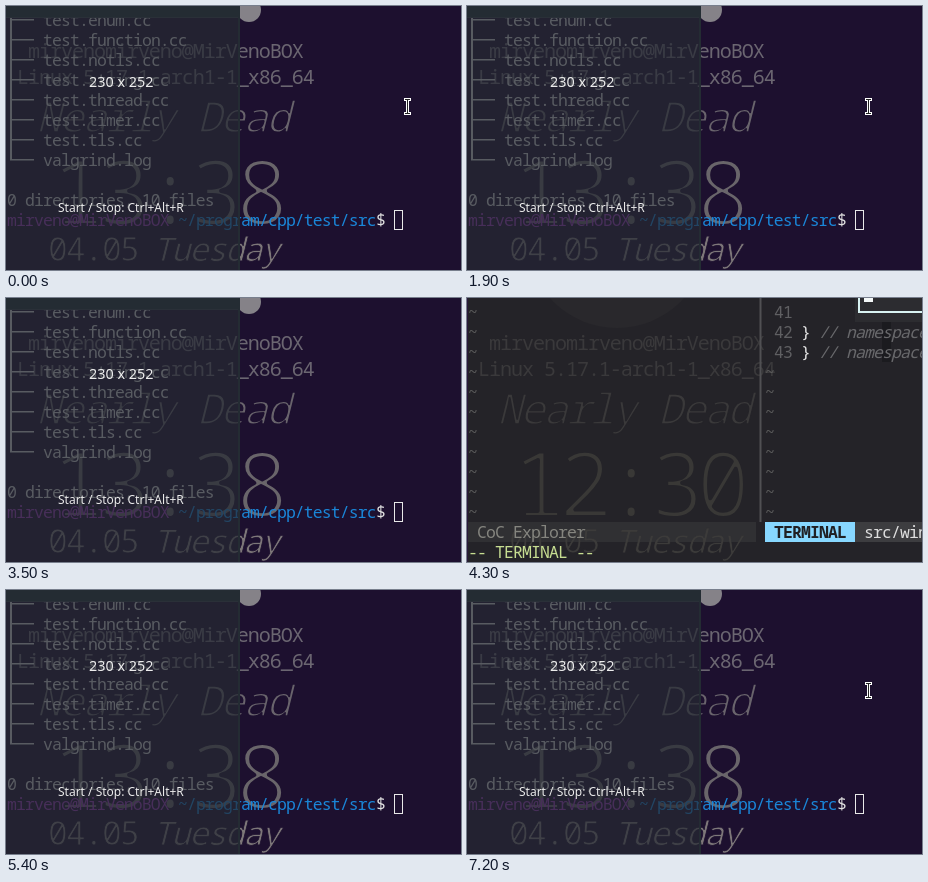
These frames come from a looping animation (455x264 px, 7400 ms). An HTML page with a canvas:

```html
<!DOCTYPE html>
<html lang="en">
<head>
<meta charset="utf-8">
<title>Flickering terminal</title>
<style>
  html, body { margin: 0; width: 100%; height: 100%; overflow: hidden; background: #242328; }
  canvas { display: block; }
</style>
</head>
<body>
<canvas id="stage" width="455" height="264"></canvas>
<script>
const ctx = document.getElementById('stage').getContext('2d');
const layer = document.createElement('canvas');
layer.width = 455;
layer.height = 264;
const ltx = layer.getContext('2d');

const LOOP = 7400, CELL = 9, ROW = 20;
const USER = 'mirveno', HOST = 'MirVenoBOX';

// The screen flips between the two windows at each of these times.
const FLIPS = [400, 1000, 1100, 1500, 1600, 1900, 2000, 2100, 2400, 3000, 3100,
  3500, 3700, 3900, 4000, 4200, 4300, 5000, 5100, 5200, 5300, 5400, 5500, 5600,
  5700, 6400, 6500, 7000];

const col = n => 1 + n * CELL;
const base = row => 20 + row * ROW;

function rect(x, y, w, h, color) {
  ctx.fillStyle = color;
  ctx.fillRect(x, y, w, h);
}

function disc(x, y, r, color) {
  ctx.fillStyle = color;
  ctx.beginPath();
  ctx.arc(x, y, r, 0, 7);
  ctx.fill();
}

// Monospaced text on a grid of the given advance.
function mono(text, x, y, color, { adv = CELL, style = '', ratio = 1.83, g = ctx } = {}) {
  g.font = `${style} ${adv * ratio}px "Noto Sans Mono", monospace`;
  g.letterSpacing = `${adv * (1 - 0.6 * ratio)}px`;
  g.fillStyle = color;
  g.fillText(text, x, y);
}

// Large light text: the outline is cut away from the regular weight.
function thin(text, x, y, color, cut, options) {
  ltx.clearRect(0, 0, 455, 264);
  mono(text, x, y, color, { ...options, g: ltx });
  ltx.globalCompositeOperation = 'destination-out';
  ltx.lineWidth = cut;
  ltx.lineJoin = 'round';
  ltx.strokeText(text, x, y);
  ltx.globalCompositeOperation = 'source-over';
  ctx.drawImage(layer, 0, 0);
}

function label(text, x, y, size) {
  ctx.font = `${size}px "Noto Sans", sans-serif`;
  ctx.letterSpacing = '0px';
  ctx.fillStyle = '#ececec';
  ctx.fillText(text, x, y);
}

function desktop(clock, [info, mood, time, date]) {
  mono(`${USER}${USER}@${HOST}`, 22, 52, info, { adv: 11 });
  mono('Linux 5.17.1-arch1-1_x86_64', 11, 78, info, { adv: 11 });
  thin('Nearly Dead', 30, 126, mood, 1.7, { adv: 23, style: 'italic' });
  thin(clock, 45, 219, time, 4, { adv: 46, ratio: 1.97 });
  thin('04.05', 42, 255, date, 0.8, { adv: 18 });
  thin('Tuesday', 147, 255, date, 0.8, { adv: 18, style: 'italic' });
}

function shell() {
  rect(0, 0, 455, 264, '#1d102f');
  disc(243, 4, 12, '#858288');
  desktop('13:38', ['#6b6671', '#69646c', '#69656a', '#7d7779']);

  const files = ['enum', 'function', 'notls', 'string', 'thread', 'timer', 'tls'];
  const ink = '#d2d2d2';
  files.forEach((name, i) => mono(`test.${name}.cc`, col(4), base(i), ink));
  mono('valgrind.log', col(4), base(7), ink);
  rect(4, 0, 2, 154, ink);
  for (let i = 0; i < 8; i++) rect(4, 13 + i * ROW, 24, 1.5, ink);
  mono('0 directories, 10 files', col(0), base(9), ink);
  mono(`${USER}@${HOST}`, col(0), base(10), '#963ab5');
  mono('~/program/cpp/test/src', col(19), base(10), '#1a86d8');
  mono('$', col(41), base(10), '#e0e0e0');
  ctx.strokeStyle = '#e8e8e8';
  ctx.lineWidth = 1;
  ctx.strokeRect(388.5, 204.5, 8, 19);

  // Recorder window dimming the left half
  rect(0, 0, 234, 264, 'rgba(38, 42, 50, .7)');
  rect(0, 0, 234, 11, '#242c33');
  rect(0, 11, 234, 1, '#2a3038');
  rect(232, 11, 2, 253, '#242c33');
  label('230 x 252', 83, 81, 14.4);
  label('Start / Stop: Ctrl+Alt+R', 52, 206, 12);
}

function pointer() {
  rect(398, 92, 7, 3, '#fff');
  rect(398, 106, 7, 3, '#fff');
  rect(400, 92, 3, 17, '#fff');
  rect(399, 93, 5, 1, '#222');
  rect(399, 107, 5, 1, '#222');
  rect(401, 93, 1, 15, '#222');
}

function editor() {
  rect(0, 0, 455, 264, '#242328');
  rect(0, 0, 1, 264, '#2b1a3c');
  disc(150, -60, 90, '#29282c');
  rect(col(46), 24, CELL, 40, '#1b1b1f');
  rect(1, 224, 288, ROW, '#303033');
  rect(388, 224, 67, ROW, '#3d3d40');
  desktop('12:30', ['#3a393b', '#3a393a', '#393836', '#3c3b3a']);

  for (let i = 0; i < 11; i++) {
    mono('~', col(0), base(i), '#5b5b5b');
    if (i > 2) mono('~', col(33), base(i), '#5b5b5b');
  }
  rect(292.5, 0, 2, 224, '#505053');

  for (let i = 0; i < 3; i++) {
    mono(String(41 + i), col(34), base(i), '#5f5f62');
    if (!i) continue;
    mono('}', col(37), base(i), '#e6e6e6');
    mono('// namespace', col(39), base(i), '#69696c', { style: 'italic' });
  }

  // Floating window in the corner
  rect(388, 0, 67, 24, '#2c2c30');
  rect(391, 0, 2, 15, '#d8f2f2');
  rect(391, 13, 64, 2, '#d8f2f2');
  rect(397, 0, CELL, 4, '#f4f8f8');

  mono('CoC Explorer', col(1), base(11), '#85857f');
  rect(298, 224, 90, ROW, '#87d7ff');
  mono('TERMINAL', col(34), base(11), '#202024', { style: 'bold' });
  mono('src/window', col(44), base(11), '#dedede');
  mono('-- TERMINAL --', col(0), base(12), '#c6dd91');
}

function frame(now) {
  const t = now % LOOP;
  const flips = FLIPS.filter(at => at <= t).length;
  if (flips % 2) {
    editor();
  } else {
    shell();
    if (t < 3000 || t >= 7200) pointer();
  }
  requestAnimationFrame(frame);
}
frame(0);
</script>
</body>
</html>
```
